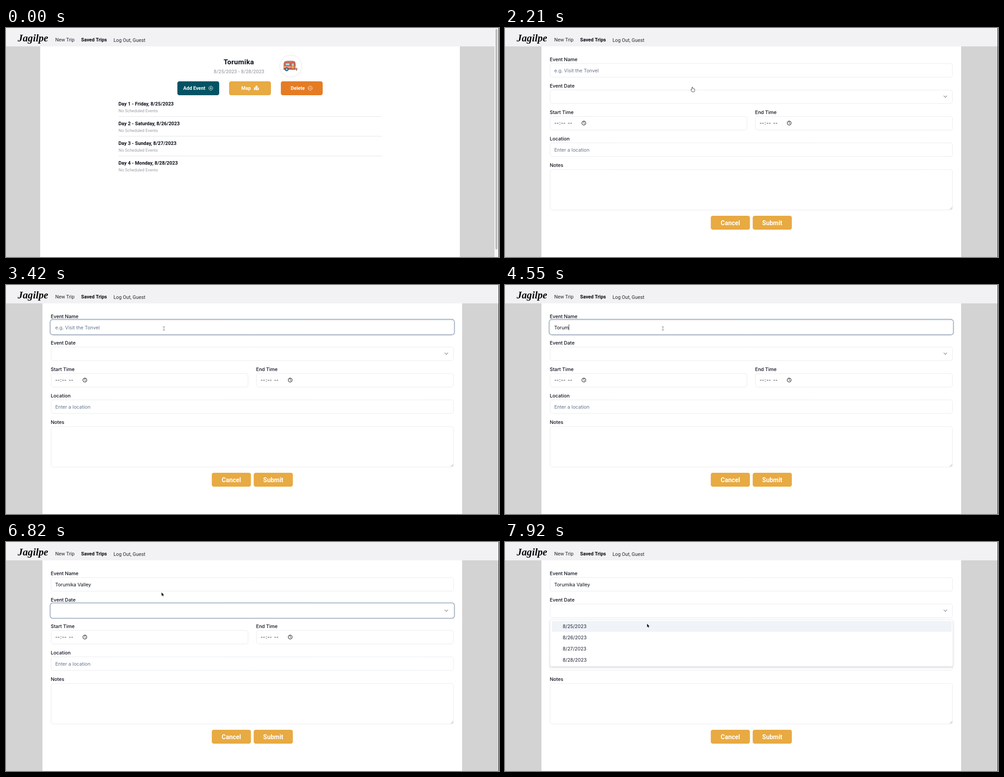
Recreate the animation shown at these times as an HTML page with a canvas. Size 1096 by 511 pixels, loop 8000 ms.

```html
<!DOCTYPE html>
<html lang="en">
<head>
<meta charset="utf-8">
<title>Trip planner</title>
<style>
html, body { margin: 0; width: 100%; height: 100%; overflow: hidden; background: #d3d3d3; }
canvas { display: block; }
</style>
</head>
<body>
<canvas id="stage" width="1096" height="511"></canvas>
<script>
const ctx = document.getElementById('stage').getContext('2d');
const LOOP = 8000, STEP = 75;
const PLACE = 'Torumika', EVENT = PLACE + ' Valley';
const DAYS = ['Friday', 'Saturday', 'Sunday', 'Monday'];
const KEY_TIMES = [3910, 3990, 4150, 4310, 4480, 4560, 4640, 4710, 4870, 5020, 5180, 5260, 5430, 5510, 5580];
const AMBER = '#e8aa42', INK = '#0b0f1c', GREY = '#9c9ea7', BORDER = '#e6e8ec';

const roboto = (size, weight = 400) => `${weight} ${size}px Roboto, sans-serif`;
const inter = (weight = 400, size = 10.7) => `${weight} ${size}px Inter, sans-serif`;
const dateOf = i => `8/${25 + i}/2023`;

function text(str, x, y, font, color = INK, align = 'left') {
  ctx.font = font;
  ctx.fillStyle = color;
  ctx.textAlign = align;
  ctx.fillText(str, x, y);
}

function rect(x, y, w, h, color) {
  ctx.fillStyle = color;
  ctx.fillRect(x, y, w, h);
}

function box(x, y, w, h, r, fill, stroke, width = 1) {
  ctx.beginPath();
  ctx.roundRect(x, y, w, h, r);
  if (fill) { ctx.fillStyle = fill; ctx.fill(); }
  if (stroke) { ctx.strokeStyle = stroke; ctx.lineWidth = width; ctx.stroke(); }
}

function disc(x, y, r, fill, stroke, width = 1) {
  box(x - r, y - r, 2 * r, 2 * r, r, fill, stroke, width);
}

function shape(d, x, y, fill, stroke, width = 1) {
  const path = new Path2D(d);
  ctx.save();
  ctx.translate(x, y);
  ctx.lineJoin = ctx.lineCap = 'round';
  if (stroke) { ctx.strokeStyle = stroke; ctx.lineWidth = width; ctx.stroke(path); }
  if (fill) { ctx.fillStyle = fill; ctx.fill(path); }
  ctx.restore();
}

// Moves from one point to another in a few eased, discrete poses.
function glide(t, start, steps, from, to) {
  const p = Math.min(steps, Math.max(0, Math.floor((t - start) / STEP) + 1)) / steps;
  const k = p * p * (3 - 2 * p);
  return from.map((v, i) => v + (to[i] - v) * k);
}

const cursors = {
  arrow(x, y) {
    shape('M0 0V7.6L1.8 6 3 8.7 4.4 8.1 3.2 5.5H5.5Z', x, y, '#111', '#fff', 1.4);
  },
  hand(x, y) {
    shape('M-1.7 1V-4.2Q-.9-5.4-.2-4.2V-1.5Q1-2 1.5-1.2 2.5-1.5 2.8-.7 4-.8 4 .4V2.5L3 5H-1.5L-4 1.2Q-3.8-.2-2.6.3Z',
      x, y, '#fff', '#222', 1.5);
  },
  beam(x, y) {
    shape('M-2-4Q0-4 0-3 0-4 2-4M0-3V3M-2 4Q0 4 0 3 0 4 2 4', x, y, null, '#666', 0.8);
  }
};

function frame(left, right) {
  rect(0, 0, 1096, 511, '#d3d3d3');
  rect(left, 41, 933, 470, '#fff');
  rect(0, 0, right, 41, '#f2f2f5');
  text('Jagilpe', 26, 30, 'italic 700 22.6px "Liberation Serif", serif', '#0a0a0a');
  text('New Trip', 109.5, 30, roboto(10.85), '#26272b');
  text('Saved Trips', 167, 30, roboto(10.85, 700), '#08090d');
  text('Log Out, Guest', 239, 30.5, roboto(10.85), '#26272b');
}

function caravan() {
  disc(633, 85, 24.5, '#fff', '#e9e9eb', 1.2);
  shape('M618 92V80Q618 74 625 74H638Q643 74 643 80V92Z', 0, 0, '#df6b5c', '#6d3b35', 1.2);
  rect(618, 86, 25, 2, '#f0c9a0');
  box(621, 78, 10, 6, 1, '#a9d5dc', '#6d3b35', 0.8);
  box(634, 78, 7, 13.5, 1, '#e3a65c', '#6d3b35', 0.8);
  rect(636, 80, 3, 4, '#a9d5dc');
  shape('M617 92H647M646 89V95', 0, 0, null, '#6d3b35', 1.2);
  disc(647, 91, 1, '#df6b5c');
  disc(624, 92, 3.8, '#3f8e9c', '#27505c', 1.2);
  disc(624, 92, 1.3, '#e8eef0');
}

function actionButton(label, x, textX, color) {
  box(x, 119, 93, 31, 4.6, color);
  text(label, textX, 138, roboto(10.85, 700), '#fff');
}

function tripPage(t) {
  frame(76, 1086);
  rect(1086, 0, 9, 511, '#f7f7f7');
  box(1088, 2, 5, 492, 2.5, '#c1c1c1');

  ctx.letterSpacing = '0.3px';
  text(PLACE, 517.5, 81, roboto(15.5, 700), INK, 'center');
  ctx.letterSpacing = '0px';
  text(`${dateOf(0)} - ${dateOf(3)}`, 518, 101, roboto(10.85, 500), '#a3a5ad', 'center');
  caravan();

  const [x, y] = glide(t, 420, 6, [594, -9], [417.5, 135.5]);
  const hover = x < 474 && y > 119;
  actionButton('Add Event', 381, 394, hover ? '#2f3142' : '#025464');
  actionButton('Map', 496, 523, AMBER);
  actionButton('Delete', 611, 633, '#e57c23');
  for (const cx of [455.3, 676.3]) disc(cx, 134.3, 4.5, null, '#fff', 0.9);
  shape('M453 134.3H457.6M455.3 132V136.6M674 134.3H678.6', 0, 0, null, '#fff', 0.9);
  shape('M551.5 133L554.3 132V138L551.5 139ZM555 133L559 135V139L555 138ZM559.7 134L562 132.3V138L559.7 139Z', 0, 0, '#fff');
  shape('M557 136Q554 132 554.6 131A2.4 2.4 0 0 1 559.4 131Q560 132 557 136Z', 0, 0, '#fff', AMBER, 0.8);
  disc(557, 131.6, 0.8, AMBER);

  DAYS.forEach((day, i) => {
    const top = 44.1 * i;
    text(`Day ${i + 1} - ${day}, ${dateOf(i)}`, 250, 173 + top, roboto(10.85, 700));
    text('No Scheduled Events', 250.3, 187.5 + top, roboto(9.3), GREY);
    if (i < 3) rect(250, Math.round(196.5 + top), 586, 1, '#e4e5e9');
  });
  (hover ? cursors.hand : cursors.arrow)(x, y);
}

function field(label, x, y, w, h = 31, value = '', color = '#64748b') {
  text(label, x - 0.5, y - 5.5, inter(500));
  box(x + 0.4, y + 0.4, w - 0.8, h - 0.8, 4.6, '#fff', BORDER, 0.9);
  text(value, x + 9.4, y + 19.5, inter(), color);
}

function timeField(label, x) {
  field(label, x, 197, 438.5);
  [['--', 9.5], [':', 20.5], ['--', 24.5], ['--', 39.5]].forEach(([s, dx]) =>
    text(s, x + dx, 216, inter(), INK));
  disc(x + 75.3, 212.2, 4.3, null, '#111', 1.1);
  shape('M0-2.6V.4L1.8 1.4', x + 75.3, 212.2, null, '#111', 0.9);
}

function dropdown(alpha) {
  ctx.save();
  ctx.globalAlpha = alpha;
  ctx.shadowColor = 'rgba(0,0,0,.16)';
  ctx.shadowBlur = 5;
  ctx.shadowOffsetY = 2;
  box(100, 172.5, 896, 105.5, 4.6, '#fff');
  ctx.shadowColor = 'transparent';
  box(100.4, 172.9, 895.2, 104.7, 4.6, null, BORDER, 0.8);
  box(104, 176, 889, 24.5, 2, '#f0f3f8');
  DAYS.forEach((_, i) => text(dateOf(i), 128.3, 192.3 + 25 * i, inter(400, 10.55), '#1b2233'));
  ctx.restore();
}

function formCursor(t) {
  if (t < 4790) {
    const [x, y] = glide(t, 2450, 4, [417.5, 137], [351, 97]);
    if (t < 2450) cursors.hand(x, y);
    else if (y < 110) cursors.beam(x, y);
    else cursors.arrow(x, y);
  } else if (t >= 6820) {
    const rest = [327, 168.5];
    cursors.arrow(...(t < 7770
      ? glide(t, 6820, 6, [347.3, 108], rest)
      : glide(t, 7770, 3, rest, [315.8, 182.5])));
  }
}

function formPage(t) {
  frame(81, 1095);
  const typed = EVENT.slice(0, KEY_TIMES.filter(k => k <= t).length);
  const open = Math.min(1, Math.max(0, Math.floor((t - 7290) / STEP) + 1) / 3);

  field('Event Name', 100, 79, 895, 31, typed || 'e.g. Visit the Tonvel', typed ? INK : undefined);
  field('Event Date', 100, 138, 895);
  shape('M-3.4-1.6L0 1.8 3.4-1.6', 979, 153, null, '#7a7d85', 1.1);
  timeField('Start Time', 100);
  timeField('End Time', 556.5);
  field('Location', 100, 256, 895, 31, 'Enter a location');
  field('Notes', 100, 315.5, 895, 91);
  shape('M989 405L994 400M992 405L994 403', 0, 0, null, '#8a8a8a', 0.7);

  for (const [label, x] of [['Cancel', 457.5], ['Submit', 550.7]]) {
    box(x, 419, 87, 31, 4.6, AMBER);
    text(label, x + 43.5, 439.5, roboto(13.95, 700), '#fff', 'center');
  }

  const ringY = t < 2850 || open ? 0 : t < 5830 ? 76.6 : 135.7;
  if (ringY) box(98, ringY, 899.2, 34.8, 6.5, null, t < 2930 ? '#c4ccd8' : '#94a3b8', 1.55);

  const caretOn = (t >= 2850 && t < 3420) || (t >= 3910 && t < 5830);
  if (caretOn) {
    ctx.font = inter();
    rect(109.4 + ctx.measureText(typed).width, 88, 0.9, 13, '#111');
  }
  if (open) dropdown(open);
  formCursor(t);
}

function draw(now) {
  const t = now % LOOP;
  (t < 2210 ? tripPage : formPage)(t);
  rect(1095, 0, 1, 511, '#151515');
  requestAnimationFrame(draw);
}
requestAnimationFrame(draw);
</script>
</body>
</html>
```
